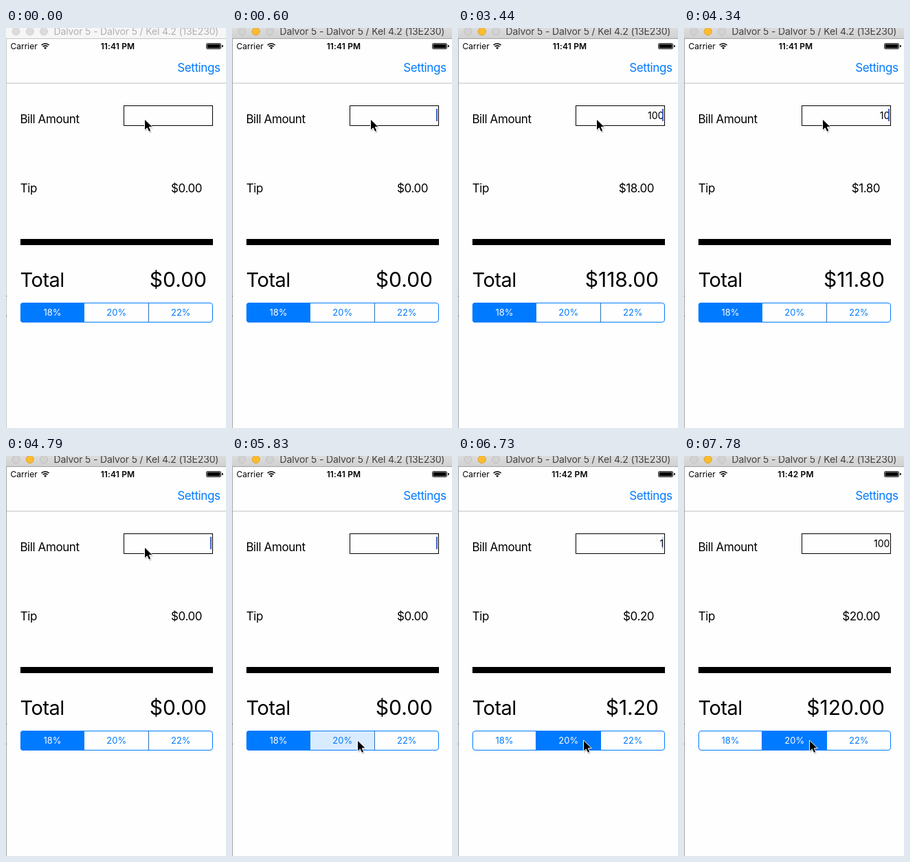
These frames come from a looping animation (320 px wide and 584 px high, 8000 ms). An HTML page:

```html
<!DOCTYPE html>
<html lang="en">
<head>
<meta charset="utf-8">
<title>Tip calculator</title>
<style>
  html, body { margin: 0; width: 100%; height: 100%; overflow: hidden; background: #fefefe; }
  svg { display: block; width: 100vw; height: 100vh; }
  text { font-family: Inter, Roboto, "Liberation Sans", sans-serif; white-space: pre; }
  .body { font-size: 17px; letter-spacing: -.41px; }
  .end { text-anchor: end; }
  .mid { text-anchor: middle; }
  .status { font-size: 12px; }
  .clock { font-weight: 600; letter-spacing: .15px; }
  .title { font-size: 14px; letter-spacing: -.15px; fill: #b0b0b0; }
  .bar { fill: #f6f6f6; }
  .edge { fill: #c6c6c6; }
  .light { fill: #dcdcdc; stroke: #cfcfcf; }
  .active .title { fill: #424242; }
  .active .bar { fill: url(#chrome); }
  .active .edge { fill: #a4a4a4; }
  .active .light { fill: #d2d2d2; stroke: #c0c0c0; }
  .active .yellow { fill: #fdbc30; stroke: #e0a028; }
  .seg rect { fill: #fefefe; }
  .seg text { font-size: 13px; fill: #007aff; }
  .seg.pressed rect { fill: #d9ebff; }
  .seg.on rect { fill: #007aff; }
  .seg.on text { fill: #fefefe; }
</style>
</head>
<body>
<svg id="stage" viewBox="0 0 320 584">
  <defs>
    <linearGradient id="chrome" x2="0" y2="1">
      <stop stop-color="#dcdcdc"/><stop offset="1" stop-color="#d1d1d1"/>
    </linearGradient>
    <clipPath id="pill"><rect x="21" y="401" width="280" height="29" rx="4"/></clipPath>
  </defs>
  <rect width="320" height="584" fill="#fefefe"/>

  <!-- window chrome -->
  <rect class="bar" width="320" height="15"/>
  <rect class="edge" y="15" width="320" height="1"/>
  <rect class="edge" y="15" width="1" height="569"/>
  <path d="M0 391.5h1M0 420.5h1" stroke="#444"/>
  <circle class="light" cx="14.5" cy="5" r="5.5"/>
  <circle class="light yellow" cx="34.8" cy="5" r="5.5"/>
  <circle class="light" cx="55" cy="5" r="5.5"/>
  <text class="title" x="69.5" y="10.3">Dalvor 5 - Dalvor 5 / Kel 4.2 (13E230)</text>

  <!-- status and navigation bars -->
  <text class="status" x="6.5" y="31">Carrier</text>
  <g fill="none" stroke="#000" stroke-width="1.7">
    <path d="M51.6 25a7.8 7.8 0 0 1 11 0M53.7 27.2a4.8 4.8 0 0 1 6.8 0"/>
    <path d="M57.1 31l-2-2.1a2.9 2.9 0 0 1 4 0z" fill="#000" stroke="none"/>
  </g>
  <text class="status clock mid" id="clock" x="162.5" y="31"></text>
  <rect x="291.5" y="22.5" width="21" height="8" rx="1.5" fill="none" stroke="#000" stroke-width=".8"/>
  <rect x="292.5" y="23.5" width="19" height="6" rx=".6"/>
  <path d="M314 24.8q2 .3 2 1.7t-2 1.7z"/>
  <text class="body" x="249.3" y="64" fill="#007aff">Settings</text>
  <rect x="1" y="80" width="319" height="1" fill="#c4c4c6"/>

  <!-- form -->
  <text class="body" x="20.4" y="138.8">Bill Amount</text>
  <rect x="171.5" y="113.5" width="129" height="29" fill="#fefefe" stroke="#000"/>
  <text class="end" id="bill" x="299.3" y="132.5" font-size="14"></text>
  <rect id="caret" x="297" y="118" width="2" height="18" fill="#3f63c8"/>
  <text class="body" x="20.8" y="239.6">Tip</text>
  <text class="body end" id="tip" x="285.2" y="239.6"></text>
  <rect x="21" y="308" width="280" height="9"/>
  <text x="20.6" y="378" font-size="29" letter-spacing="-.5">Total</text>
  <text class="end" id="total" x="292" y="378" font-size="30"></text>

  <!-- rate picker -->
  <g clip-path="url(#pill)">
    <g class="seg"><rect x="21" y="401" width="93" height="29"/><text class="mid" x="67.5" y="420.2">18%</text></g>
    <g class="seg"><rect x="114" y="401" width="94" height="29"/><text class="mid" x="160.8" y="420.2">20%</text></g>
    <g class="seg"><rect x="208" y="401" width="93" height="29"/><text class="mid" x="254.3" y="420.2">22%</text></g>
  </g>
  <path d="M113.5 401v29" stroke="#007aff"/>
  <path id="divider" d="M207.5 401v29" stroke="#2a6cb4"/>
  <rect x="21.5" y="401.5" width="279" height="28" rx="3.6" fill="none" stroke="#007aff"/>

  <g id="cursor">
    <path d="M1 2v16.6l3.8-3.6 2.6 5.6 3-1.3-2.6-5.6h5z" opacity=".18"/>
    <path d="M0 0v16.5l3.8-3.6 2.5 5.6 3-1.3-2.5-5.5h5.1z" stroke="#fff" stroke-width="1"/>
  </g>
</svg>
<script>
  const LOOP = 8000;
  const rates = [18, 20, 22];

  // Each track holds [start time, value] pairs.
  const tracks = {
    active: [[0, false], [450, true]],
    clock: [[0, "11:41 PM"], [6130, "11:42 PM"]],
    bill: [[0, ""], [2100, "1"], [2250, "10"], [2400, "100"], [4340, "10"], [4490, "1"],
           [4790, ""], [6730, "1"], [6880, "10"], [7180, "100"]],
    caret: [[0, 0], [600, 1], [1200, .3], [1350, 0], [1650, 1], [3000, .3], [3150, 0],
            [3440, 1], [3890, .3], [4040, 0], [4340, 1], [5240, .3], [5390, 0], [5680, 1],
            [6280, .3], [6430, 0], [6730, .3], [6880, 1], [7630, .3], [7780, 0]],
    cursor: [[0, [201.5, 133]], [5240, [199, 210]], [5390, [195, 350]],
             [5540, [188, 436]], [5680, [182.5, 415]]],
    pressed: [[0, -1], [5830, 1], [5980, -1]],
    chosen: [[0, 0], [5980, 1]]
  };

  const $ = id => document.getElementById(id);
  const segs = document.querySelectorAll(".seg");
  const at = (track, t) => track.reduce((v, [start, value]) => start <= t ? value : v, null);
  const money = n => "$" + n.toFixed(2);

  function setText(id, s) {
    if ($(id).textContent !== s) $(id).textContent = s;
  }

  function draw(t) {
    const s = {};
    for (const key in tracks) s[key] = at(tracks[key], t);
    const bill = Number(s.bill);
    const tip = bill * rates[s.chosen] / 100;

    $("stage").classList.toggle("active", s.active);
    setText("clock", s.clock);
    setText("bill", s.bill);
    setText("tip", money(tip));
    setText("total", money(bill + tip));
    $("caret").setAttribute("opacity", s.caret);
    $("cursor").setAttribute("transform", `translate(${s.cursor})`);
    $("divider").setAttribute("stroke", s.chosen === 1 ? "#007aff" : "#2a6cb4");
    segs.forEach((seg, i) => {
      seg.classList.toggle("on", i === s.chosen);
      seg.classList.toggle("pressed", i === s.pressed);
    });
  }

  const begin = performance.now();
  function tick() {
    draw((performance.now() - begin) % LOOP);
    requestAnimationFrame(tick);
  }
  tick();
</script>
</body>
</html>
```
